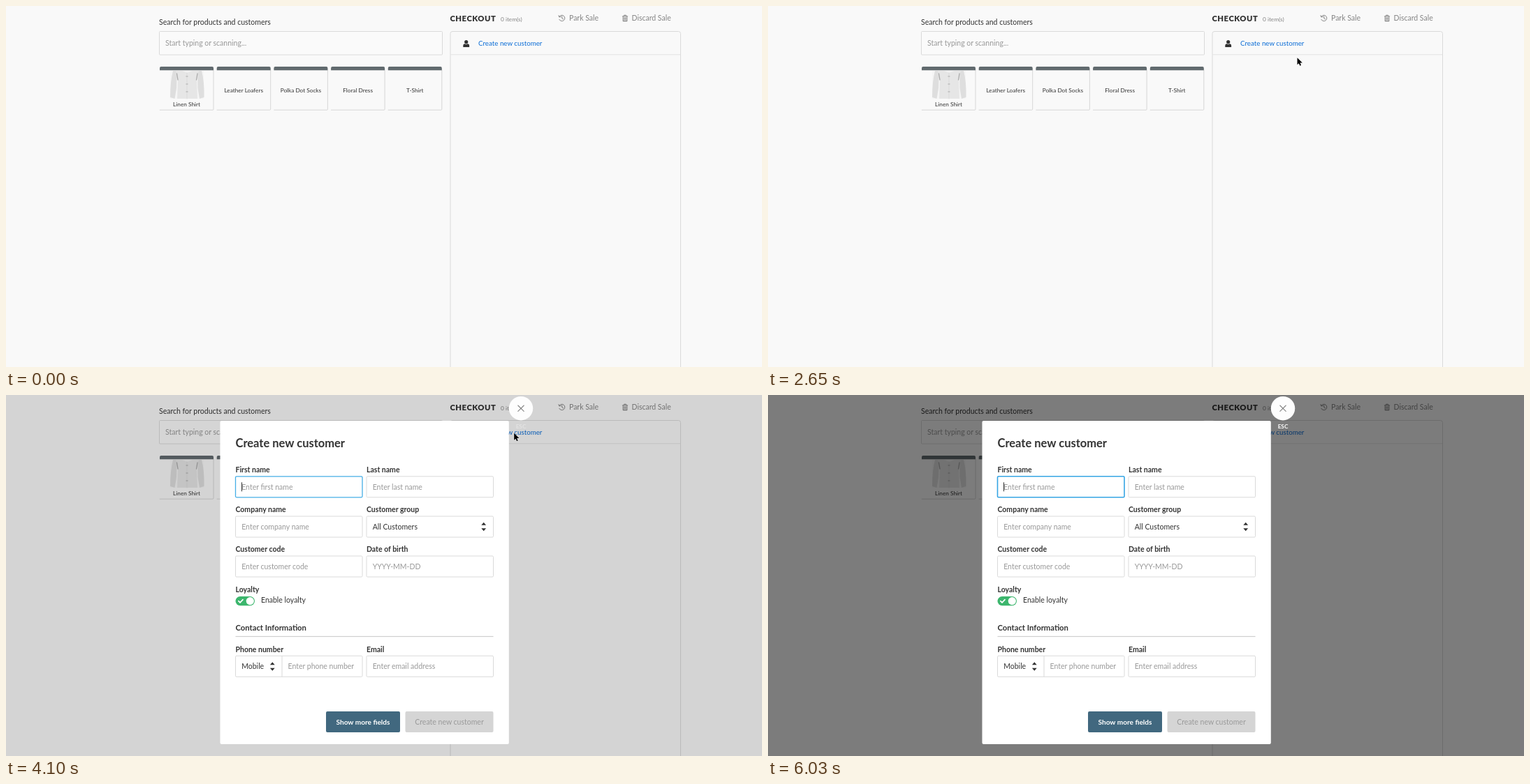
An HTML page for the animation above (6.25 s loop, 1082 by 518 pixels).

```html
<!DOCTYPE html>
<html lang="en">
<head>
<meta charset="utf-8">
<title>Checkout</title>
<style>
  html, body { margin: 0; width: 100%; height: 100%; overflow: hidden; background: #f9f9f9; }
  svg { display: block; width: 100%; height: 100%; }
  text { font-family: Lato, "Open Sans", sans-serif; white-space: pre; }
</style>
</head>
<body>
<svg id="stage" viewBox="0 0 1082 518"></svg>
<script>
const LOOP = 6250;
const INK = '#333', HINT = '#999', LINE = '#dadada';
const stage = document.getElementById('stage');

const text = (x, y, s, { size = 10.5, fill = INK, weight = 400, more = '' } = {}) =>
  `<text x="${x}" y="${y}" font-size="${size}" fill="${fill}" font-weight="${weight}" ${more}>${s}</text>`;
const box = (x, y, w, h, fill, more = '') =>
  `<rect x="${x}" y="${y}" width="${w}" height="${h}" fill="${fill}" ${more}/>`;
const path = (d, fill, more = '') => `<path d="${d}" fill="${fill}" ${more}/>`;
const stroked = (d, color, width = 1) =>
  path(d, 'none', `stroke="${color}" stroke-width="${width}" stroke-linecap="round" stroke-linejoin="round"`);

function shirt() {
  const buttons = [100.5, 111.5, 122.5].map(y => box(257.5, y, 3, 1, '#aaa')).join('');
  return box(235, 93, 48, 40, '#f5f5f5')
    + path('M239 93H245L244 118L241.5 133L235 131Q235 108 239 93Z', '#dedede')
    + path('M274 93H280Q284 108 283.5 131L277 133L274.5 118Z', '#dedede')
    + path('M243 93H276L273 106L274 133H245L246 106Z', '#e6e6e6')
    + path('M252 93H267L259.5 96Z', '#f1f1f1')
    + stroked('M244.5 97L246 106M274 97L272.5 106', '#aaa', 1.3)
    + stroked('M259 96V133', '#d6d6d6', .7) + buttons;
}

function tile(name, i) {
  const x = 220 + i * 81.7, mid = x + 38.5;
  return box(x, 88, 77, 61.5, '#f9f9f9', 'class="pale" rx="1.5"')
    + stroked(`M${x + .3} 149.2H${x + 76}Q${x + 77} 149.2 ${x + 77} 148V92`, '#d3d3d3', .9)
    + path(`M${x} 92.3V89Q${x} 87 ${x + 2} 87H${x + 75}Q${x + 77} 87 ${x + 77} 89V92.3Z`, '#616a6e')
    + (i ? '' : shirt())
    + text(mid, i ? 124 : 143.7, name, { size: 8.25, more: 'text-anchor="middle"' });
}

function page() {
  const tools = '#858585';
  return text(219, 27, 'Search for products and customers')
    + box(219.5, 36.5, 405, 33.5, '#fafafa', `stroke="${LINE}" rx="1"`)
    + text(228, 57.2, 'Start typing or scanning...', { fill: HINT })
    + ['Linen Shirt', 'Leather Loafers', 'Polka Dot Socks', 'Floral Dress', 'T-Shirt'].map(tile).join('')
    + text(635.5, 22, 'CHECKOUT', { size: 11.25, weight: 900, more: 'letter-spacing=".5"' })
    + text(708, 22, '0 item(s)', { size: 8.25, fill: tools })
    + stroked('M792 15.2A4.2 4.2 0 1 1 791.8 19.3M791 13.6L791.9 16L794.3 15.4M795.8 15V17.8L797.6 18.8', tools)
    + text(806, 21.3, 'Park Sale', { fill: tools })
    + stroked('M882.3 14.8H889.7M884.5 14.5V13.2H887.5V14.5', tools)
    + stroked('M883.2 15.5V21.6H888.8V15.5M885.1 16.5V20M886.9 16.5V20', tools, 1.1)
    + text(895.5, 21.3, 'Discard Sale', { fill: tools })
    + box(636, 36.5, 329.5, 500, '#f9f9f9', `class="pale" stroke="${LINE}" rx="3"`)
    + box(636.5, 69.3, 328.5, 1, '#e3e3e3')
    + '<circle cx="658.7" cy="51.6" r="2.6" fill="#333"/>'
    + path('M654.3 59V57Q654.3 54.3 656.8 54.2Q658.7 55.6 660.6 54.2Q663.1 54.3 663.1 57V59Z', INK)
    + text(676, 57.2, 'Create new customer', { size: 9.75, fill: '#0b6dd6' })
    + box(674.5, 45.5, 94.5, 16.5, 'none', 'id="ring" stroke="#6fabe0" stroke-width="2" rx="2"');
}

const label = (x, y, s, size) => text(x, y, s, { weight: 700, size });
const input = (x, y, w, hint, color = HINT, more = '') =>
  box(x, y, w, 30, '#fff', `stroke="${LINE}" rx="1.5" ${more}`)
  + text(x + 8.7, y + 19, hint, { fill: color });
const arrows = (x, y) =>
  path(`M${x - 3.4} ${y - 2.2}L${x} ${y - 6.2}L${x + 3.4} ${y - 2.2}ZM${x - 3.4} ${y + 2.2}L${x} ${y + 6.2}L${x + 3.4} ${y + 2.2}Z`, INK);

function dialog() {
  const a = 328.5, b = 516, w = 181.5;
  return box(306.5, 37, 413.3, 464, '#fff', 'id="sheet" rx="2"')
    + text(328.5, 74.8, 'Create new customer', { size: 16.5, weight: 700 })
    + label(a, 110.7, 'First name') + input(a, 116.8, w, 'Enter first name', HINT, 'id="focus"')
    + label(b, 110.7, 'Last name') + input(b, 116.8, w, 'Enter last name')
    + label(a, 168, 'Company name') + input(a, 174, w, 'Enter company name')
    + label(b, 168, 'Customer group') + input(b, 174, w, 'All Customers', INK) + arrows(683.7, 189)
    + label(a, 225.2, 'Customer code') + input(a, 231, w, 'Enter customer code')
    + label(b, 225.2, 'Date of birth') + input(b, 231, w, 'YYYY-MM-DD')
    + label(a, 282.5, 'Loyalty')
    + box(328.5, 289, 27.5, 13.2, '#3cb66d', 'rx="6.6"')
    + '<circle cx="349.3" cy="295.6" r="5.6" fill="#fff"/>'
    + stroked('M332.8 295.7L335 297.8L339 293.6', '#fff', 1.7)
    + text(365, 298.3, 'Enable loyalty')
    + label(a, 338, 'Contact Information', 11.25)
    + box(328.5, 345.9, 369, 1.2, '#cfcfcf')
    + label(a, 368.6, 'Phone number') + input(a, 374.3, w, 'Mobile', INK) + arrows(381.3, 389.5)
    + box(394.5, 374.3, 1, 30, LINE) + text(403.5, 393.3, 'Enter phone number', { fill: HINT })
    + label(b, 368.6, 'Email') + input(b, 374.3, w, 'Enter email address')
    + box(458, 454, 106, 30, '#41687f', 'rx="2"')
    + text(511, 473, 'Show more fields', { size: 10.1, weight: 700, fill: '#fff', more: 'text-anchor="middle"' })
    + box(571.5, 454, 126, 30, '#d5d5d5', 'rx="2"')
    + text(634.5, 473, 'Create new customer', { fill: HINT, more: 'text-anchor="middle"' })
    + box(337, 125.3, 1, 13, INK, 'id="caret"')
    + '<circle cx="737" cy="19.2" r="17.2" fill="#fdfdfd"/>'
    + stroked('M732.8 15L741.2 23.4M741.2 15L732.8 23.4', '#858585', 1.1)
    + text(737, 48.2, 'ESC', { size: 8.25, weight: 700, fill: '#fff', more: 'id="esc" text-anchor="middle"' });
}

stage.innerHTML = page()
  + box(0, 0, 1082, 518, '#000', 'id="shade"')
  + `<g id="dialog">${dialog()}</g>`
  + path('M.5 .3V10.3L2.8 8.2L4.3 11.8L6 11.1L4.5 7.6H7.8Z', '#000',
         'id="pointer" stroke="#fff" stroke-width=".8" paint-order="stroke"');

const part = {};
for (const el of stage.querySelectorAll('[id]')) part[el.id] = el;
const pale = stage.querySelectorAll('.pale');

// Pointer moves: first step, last step, step count, end x, end y
const MOVES = [
  [770, 770, 1, 1078, 296], [980, 980, 1, 1041, 267], [1040, 1160, 3, 984, 227],
  [1220, 1280, 2, 962, 210], [1340, 1570, 5, 914, 179], [1630, 2250, 12, 800, 103],
  [2310, 2650, 7, 757, 74], [2710, 2880, 4, 730, 58], [2940, 2940, 1, 724, 55],
  [3060, 3060, 1, 726.7, 54.5], [4340, 4340, 1, 730.5, 54.5], [4550, 4550, 1, 766, 80],
  [4790, 5400, 11, 938, 337], [5490, 5880, 8, 1056, 516], [6030, 6030, 1, 1100, 540]
];

function pointerAt(t) {
  let x = 1100, y = 310;
  for (const [start, end, steps, toX, toY] of MOVES) {
    if (t < start) break;
    const gap = steps > 1 ? (end - start) / (steps - 1) : 1;
    const k = Math.min(1, (Math.floor((t - start) / gap + .001) + 1) / steps);
    x += (toX - x) * k;
    y += (toY - y) * k;
  }
  return [x, y];
}

// Start, shade, dialog opacity, ESC opacity, focus colour, focus width
const OPENING = [
  [0, 0, 0, 0, LINE, 1], [3920, .015, .5, 0, LINE, 1], [4010, .045, 1, 0, '#b3d6e4', 1],
  [4100, .15, 1, .35, '#45aee6', 1.3], [4340, .5, 1, 1, '#36a5e4', 1.6]
];
const caretOn = t => t < 4550 || (t >= 4850 && t < 5370) || t >= 5850;

function draw(t) {
  const [start, shade, dialogAlpha, esc, focus, focusWidth] = OPENING.findLast(o => t >= o[0]);
  part.shade.setAttribute('opacity', shade);
  part.dialog.setAttribute('opacity', dialogAlpha);
  part.esc.setAttribute('opacity', esc);
  part.focus.setAttribute('stroke', focus);
  part.focus.setAttribute('stroke-width', focusWidth);
  part.sheet.setAttribute('fill', t < 4100 ? '#fcfcfc' : '#fff');
  part.caret.setAttribute('opacity', caretOn(t) ? 1 : 0);
  part.ring.setAttribute('opacity', t >= 3560 && t < 3920 ? .8 : 0);
  for (const el of pale) el.setAttribute('fill', start === 4010 ? '#fff' : '#f9f9f9');
  part.pointer.setAttribute('transform', `translate(${pointerAt(t)})`);
}

const begin = performance.now();
function tick() {
  draw((performance.now() - begin) % LOOP);
  requestAnimationFrame(tick);
}
tick();
</script>
</body>
</html>
```
